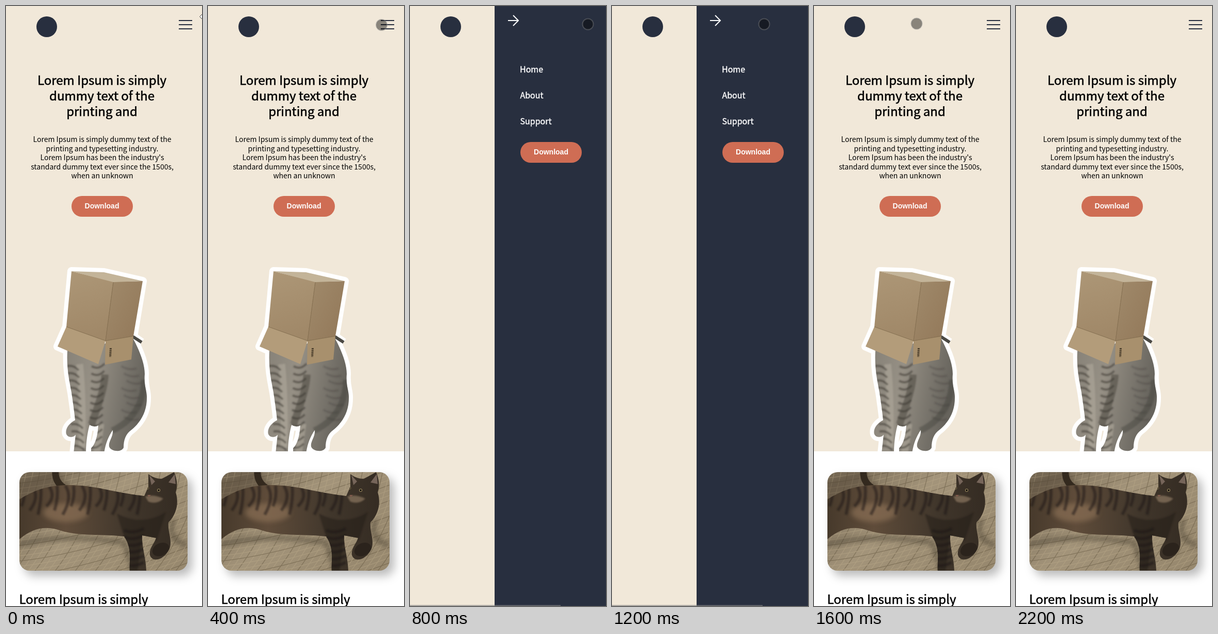
Animation of 380x1156 px, one loop 2400 ms. Source, as an HTML page:

```html
<!DOCTYPE html>
<html lang="en">
<head>
<meta charset="utf-8">
<title>Mobile landing page</title>
<style>
  html, body { margin: 0; width: 380px; height: 1156px; overflow: hidden; background: #fff; }
  svg { display: block; }
  text { font-family: "Noto Sans CJK KR", "Noto Sans CJK JP", "Noto Sans CJK SC", "Noto Sans CJK", sans-serif; }
  .title { font-size: 24px; stroke: #000; stroke-width: .55px; }
  .body { font-size: 14px; }
  .link { font-size: 16px; fill: #fff; stroke: #fff; stroke-width: .4px; }
  .label { font: bold 14px "Liberation Sans", Arial, sans-serif; fill: #fff; }
  .mid { text-anchor: middle; }
  .photo { filter: drop-shadow(9px 10px 9px rgba(0, 0, 0, .27)); }
</style>
</head>
<body>
<svg width="380" height="1156" viewBox="0 0 380 1156">
  <defs>
    <linearGradient id="fur" x1="0" x2="1" y2=".25">
      <stop offset="0" stop-color="#868177"/><stop offset=".4" stop-color="#969085"/><stop offset="1" stop-color="#66635c"/>
    </linearGradient>
    <linearGradient id="card" x1="0" x2=".2" y2="1">
      <stop offset="0" stop-color="#ad9777"/><stop offset="1" stop-color="#a08868"/>
    </linearGradient>
    <linearGradient id="side" x1="0" x2="1" y2=".8">
      <stop offset="0" stop-color="#a08a6b"/><stop offset="1" stop-color="#93795a"/>
    </linearGradient>
    <linearGradient id="quilt" x1="0" x2="1" y2=".6">
      <stop offset="0" stop-color="#716450"/><stop offset=".5" stop-color="#a3947a"/><stop offset="1" stop-color="#98896f"/>
    </linearGradient>
    <linearGradient id="coat" x1="0" x2="1">
      <stop offset="0" stop-color="#46392b"/><stop offset=".3" stop-color="#5f4c3a"/><stop offset=".7" stop-color="#40362b"/><stop offset="1" stop-color="#352c23"/>
    </linearGradient>
    <filter id="soft" x="-20%" y="-20%" width="140%" height="140%"><feGaussianBlur stdDeviation="1.6"/></filter>
    <filter id="softer" x="-30%" y="-30%" width="160%" height="160%"><feGaussianBlur stdDeviation="5"/></filter>
    <clipPath id="hero"><rect width="380" height="858"/></clipPath>
    <clipPath id="frame"><rect x="26" y="898" width="326" height="190" rx="20"/></clipPath>
    <path id="sitter" d="M119 664C117 700 123 722 127 745Q132 778 134 798C122 804 114 815 117 825C121 833 132 831 135 826L131 862H155C155 840 158 822 162 807Q171 813 179 808C178 826 174 844 165 852V862H190C193 844 197 832 207 817C208 831 198 839 200 849C203 858 223 861 228 851C228 836 232 824 244 816C261 802 273 782 273 756C274 742 267 733 269 709C269 688 258 662 246 640Z"/>
    <clipPath id="sitterClip"><use href="#sitter"/></clipPath>
    <path id="carton" d="M127 511L190 513L265 530L247 637L243 681L192 691V650L179 690L100 656L117 618Z"/>
    <path id="lounger" d="M24 952C55 932 82 924 118 923C168 922 207 937 268 944L276 926L276 902Q288 911 302 911L326 898Q335 919 329 937C335 955 332 978 315 995C313 1013 323 1028 317 1046C306 1068 284 1073 279 1058C277 1045 288 1035 291 1025L264 1020C263 1045 272 1062 272 1092H240C238 1070 246 1047 229 1022C185 1017 145 1022 107 1011C76 1000 50 1006 24 1029Z"/>
    <clipPath id="loungerClip"><use href="#lounger"/></clipPath>
  </defs>

  <g id="page">
    <rect width="380" height="858" fill="#f1e8d9"/>
    <path d="M335 28H361M335 36H361M335 44H361" stroke="#282f3f" stroke-width="2"/>
    <g id="copy"></g>
    <rect x="127" y="366" width="119" height="40" rx="20" fill="#cf6d54"/>
    <text class="label mid" x="186" y="390">Download</text>

    <g clip-path="url(#hero)">
      <g fill="#fff" stroke="#fff" stroke-width="16" stroke-linejoin="round">
        <use href="#sitter"/><use href="#carton"/><path d="M247 637L263 648"/>
      </g>
      <path d="M246 637L263 648" stroke="#4b4943" stroke-width="6"/>
      <use href="#sitter" fill="url(#fur)"/>
      <g clip-path="url(#sitterClip)" fill="none" filter="url(#soft)">
        <path d="M192 710C190 745 174 780 166 806" stroke="#4b4841" stroke-width="14" opacity=".55"/>
        <path d="M143 690Q150 758 147 850M184 805L176 860" stroke="#b5aea0" stroke-width="13" opacity=".5"/>
        <path d="M268 720Q266 790 206 818" stroke="#413f3a" stroke-width="12" opacity=".4"/>
        <g id="bands" stroke="#3a3832" stroke-width="4" opacity=".55"></g>
      </g>
      <path d="M117 618L193 645L179 690L100 656Z" fill="#b39c7a"/>
      <path d="M193 645L247 636L243 681L192 691Z" fill="#a8906d"/>
      <path d="M127 511L208 531L193 645L117 618Z" fill="url(#card)"/>
      <path d="M208 531L265 530L247 636L193 645Z" fill="url(#side)"/>
      <path d="M127 511L190 513L265 530L208 532Z" fill="#c3b499"/>
      <path d="M208 532L193 645M117 618L193 645L247 636" fill="none" stroke="#76603f" opacity=".8"/>
      <path d="M203 659L202 676" stroke="#514431" stroke-width="4" stroke-dasharray="3 1"/>
    </g>

    <g class="photo"><g clip-path="url(#frame)">
      <rect x="26" y="898" width="326" height="190" fill="url(#quilt)"/>
      <g id="plaid" fill="none" stroke-width="1.2" opacity=".4"></g>
      <path d="M20 920L90 893L130 928L20 960Z" fill="#584c3b" opacity=".5" filter="url(#softer)"/>
      <path d="M24 1037Q118 1015 230 1034L248 1092M325 990Q310 1030 352 1038" fill="none" stroke="#40372b" stroke-width="9" opacity=".5" filter="url(#softer)"/>
      <path d="M96 895Q94 916 112 928" fill="none" stroke="#33291e" stroke-width="13"/>
      <use href="#lounger" fill="url(#coat)"/>
      <g clip-path="url(#loungerClip)">
        <ellipse cx="116" cy="976" rx="44" ry="18" fill="#92765a" opacity=".6" filter="url(#softer)"/>
        <path d="M215 978Q264 1004 310 975L292 1030L264 1020L255 1088L236 1088L229 1022Z" fill="#211c17" opacity=".5" filter="url(#soft)"/>
        <g id="stripes" fill="none" stroke="#1f1913" stroke-width="6" opacity=".5" filter="url(#soft)"></g>
        <path d="M278 904L289 916L282 923ZM327 902L329 921L315 918Z" fill="#76655a"/>
        <path d="M270 945Q286 940 305 949Q293 961 276 955Z" fill="#a28b71" opacity=".55" filter="url(#soft)"/>
        <circle cx="275" cy="929" r="2" fill="#a08e62"/><circle cx="296" cy="933" r="3" fill="#a08e62"/>
        <circle cx="275" cy="929" r="1.3" fill="#15110d"/><circle cx="296" cy="933" r="2" fill="#15110d"/>
        <path d="M274 942L281 942L277 946Z" fill="#805b4d"/>
        <ellipse cx="300" cy="1047" rx="17" ry="12" fill="#2b231c" transform="rotate(-25 300 1047)"/>
      </g>
    </g></g>
    <text class="title" x="25.5" y="1152">Lorem Ipsum is simply</text>
  </g>

  <g id="menu">
    <rect width="164" height="1156" fill="#f1e8d9"/>
    <rect x="164" width="216" height="1156" fill="#282f3f"/>
    <path d="M190 28H210M200 18L210 28L200 38" fill="none" stroke="#fff" stroke-width="2"/>
    <text class="link" x="213" y="128">Home</text>
    <text class="link" x="213.5" y="178">About</text>
    <text class="link" x="213.5" y="228">Support</text>
    <rect x="214" y="262" width="119" height="40" rx="20" fill="#cf6d54"/>
    <text class="label mid" x="273.5" y="286">Download</text>
    <rect id="bar" y="1154" width="292" height="2" fill="#808080" opacity=".6"/>
  </g>

  <circle cx="79" cy="40" r="20" fill="#282f3f"/>
  <path id="edge" d="M382 14L375.5 20.5L382 27" fill="#fff" stroke="#333"/>
  <circle id="touch" r="10.5" fill="#000" fill-opacity=".43" stroke="#808080" stroke-opacity=".42" stroke-width="2"/>
</svg>
<script>
const $ = id => document.getElementById(id);

function add(parent, tag, attrs, content = "") {
  const el = document.createElementNS("http://www.w3.org/2000/svg", tag);
  for (const key in attrs) el.setAttribute(key, attrs[key]);
  el.textContent = content;
  parent.append(el);
}

function paragraph(lines, kind, x, top, step) {
  lines.forEach((line, i) =>
    add($("copy"), "text", { class: kind + " mid", x, y: Math.round(top + i * step) }, line));
}

paragraph(["Lorem Ipsum is simply", "dummy text of the", "printing and"], "title", 186, 152, 30);
paragraph([
  "Lorem Ipsum is simply dummy text of the",
  "printing and typesetting industry.",
  "Lorem Ipsum has been the industry's",
  "standard dummy text ever since the 1500s,",
  "when an unknown"
], "body", 186.5, 262, 17.5);

// Fur markings
for (let i = 0; i < 12; i++) {
  const y = 694 + i * 14;
  add($("bands"), "path", { d: `M${118 + i} ${y}q13 -3 23 8M${166 - i / 2} ${y}q13 8 25 -5` });
  if (i < 8) add($("bands"), "path", { d: `M${224 + i % 3 * 5} ${y}q15 9 29 4`, opacity: .45 });
}
for (let i = 0; i < 15; i++) {
  const x = 35 + i * 16;
  add($("stripes"), "path", { d: `M${x} 924q${i % 2 ? 15 : 3} 22 -5 ${40 + i % 3 * 8}` });
  if (i < 6) add($("stripes"), "path", { d: `M229 ${1010 + i * 13}q17 8 38 -3` });
}

// Plaid quilt
for (let i = 0; i < 46; i++) {
  const stroke = i % 3 ? "#c1b08f" : "#51452f", x = -140 + i * 13, y = 830 + i * 10;
  add($("plaid"), "path", { stroke, d: `M${x} 1090Q${x + 70} 1000 ${x + 90} 890M20 ${y}Q150 ${y - 12} 360 ${y - 90}` });
}

// time, x, y
const path = [
  [100, 372, 20], [200, 360, 27], [300, 346, 34], [400, 336.5, 36.5], [500, 341, 36], [600, 345, 35],
  [1000, 345, 35], [1100, 335, 35], [1200, 295, 35], [1300, 242, 35], [1400, 209, 34], [1500, 199, 34],
  [1600, 199, 34], [1700, 199, 32], [1900, 198, 25], [2100, 198, 13]
];

function pointAt(t) {
  const n = path.findIndex(p => p[0] >= t);
  const b = path[n], a = path[Math.max(0, n - 1)];
  const k = a === b ? 0 : (t - a[0]) / (b[0] - a[0]);
  return [a[1] + (b[1] - a[1]) * k, a[2] + (b[2] - a[2]) * k];
}

const show = (id, on) => $(id).setAttribute("visibility", on ? "visible" : "hidden");

function draw() {
  const t = Math.floor(performance.now() % 2400 / 100) * 100;
  const open = t >= 800 && t < 1600, touching = t >= 100 && t < 2200;
  show("page", !open);
  show("menu", open);
  show("bar", open && t < 1300);
  show("edge", t === 0);
  show("touch", touching);
  if (touching) $("touch").setAttribute("transform", `translate(${pointAt(t)})`);
  requestAnimationFrame(draw);
}
draw();
</script>
</body>
</html>
```
